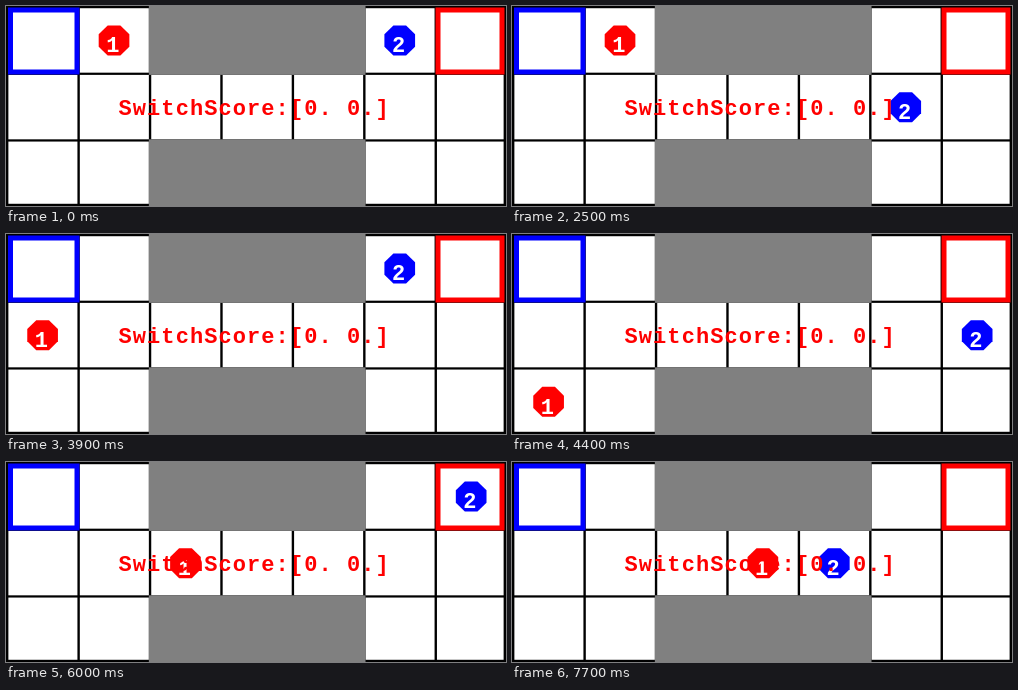
An HTML page that plays this animation: 500 px wide and 200 px high, repeating every 8000 ms.

```html
<!DOCTYPE html>
<html lang="en">
<head>
<meta charset="utf-8">
<title>Switch grid</title>
<style>
  html, body { margin: 0; width: 100%; height: 100%; overflow: hidden; background: #fff; }
  svg { display: block; width: 500px; height: 200px; }
  text { font: bold 22px "Liberation Mono", "DejaVu Sans Mono", monospace; white-space: pre; }
  .score { fill: #f00; letter-spacing: 1.08px; }
  .label { fill: #fff; text-anchor: middle; }
</style>
</head>
<body>
<svg id="stage" viewBox="0 0 500 200"></svg>
<script>
const LOOP = 8000, TICK = 100;
const CELL_W = 500 / 7, CELL_H = 200 / 3;
const LINE_W = 2.38, LINE_H = 2.22;
const stage = document.getElementById('stage');

function add(tag, attrs, parent = stage) {
  const el = document.createElementNS('http://www.w3.org/2000/svg', tag);
  for (const key in attrs) el.setAttribute(key, attrs[key]);
  return parent.appendChild(el);
}

function box(x, y, width, height, fill) {
  add('rect', { x, y, width, height, fill });
}

function frame(x, y, width, height, stroke) {
  const w = 5;
  add('rect', { x: x + w / 2, y: y + w / 2, width: width - w, height: height - w,
    fill: 'none', stroke, 'stroke-width': w });
}

function drawBoard() {
  for (let c = 0; c <= 7; c++) {
    box(Math.min(c * CELL_W, 500 - LINE_W), 0, LINE_W, 200, '#000');
  }
  for (let r = 0; r <= 3; r++) {
    box(0, Math.min(r * CELL_H, 200 - LINE_H), 500, LINE_H, '#000');
  }
  const wallW = 3 * CELL_W + LINE_W;
  box(2 * CELL_W, 0, wallW, CELL_H + LINE_H, '#808080');
  box(2 * CELL_W, 2 * CELL_H, wallW, CELL_H, '#808080');
  frame(2, 1.5, 71.5, 67, '#00f');
  frame(429.5, 1.5, 69, 67, '#f00');
}

// Moves read "tick + direction"; each one shifts the agent by a cell.
const STEP = { L: [-1, 0], R: [1, 0], U: [0, -1], D: [0, 1] };

function makeAgent(name, color, col, row, moves) {
  const group = add('g', {});
  const points = Array.from({ length: 8 }, (_, i) => {
    const a = (i + 0.5) * Math.PI / 4;
    return `${(16.6 * Math.cos(a)).toFixed(2)},${(16.2 * Math.sin(a)).toFixed(2)}`;
  });
  add('polygon', { points: points.join(' '), fill: color }, group);
  add('text', { class: 'label', x: -1.2, y: 11.8 }, group).textContent = name;

  const steps = moves.split(' ').map(m => ({ tick: parseInt(m, 10), dir: STEP[m.slice(-1)] }));
  return tick => {
    let x = col, y = row;
    for (const s of steps) {
      if (s.tick > tick) break;
      x += s.dir[0];
      y += s.dir[1];
    }
    group.setAttribute('transform',
      `translate(${x * CELL_W + 36.6} ${y * CELL_H + 34.5})`);
  };
}

drawBoard();
const agents = [
  makeAgent('1', '#f00', 1, 0,
    '2L 4R 7L 10R 17L 19R 20L 22R 26L 27D 29R 32D 34U 35L 37U 39D 41D 43R 44L ' +
    '46U 49D 52U 54R 58D 59U 60R 62R 64L 65R 69R 71L 73L 76R'),
  makeAgent('2', '#00f', 5, 0,
    '3D 8D 9R 10L 11U 13R 14D 15L 16R 17U 25L 27D 28R 30U 31U 33D 36U 38L 40R ' +
    '42D 45U 47L 48R 50D 53L 55D 56R 57U 59U 63D 67U 68L 69R 72D 75L 77L')
];
add('text', { class: 'score', x: 112.5, y: 109 }).textContent = 'SwitchScore:[0. 0.]';

const start = performance.now();
function draw() {
  const tick = Math.floor((performance.now() - start) % LOOP / TICK);
  agents.forEach(place => place(tick));
  requestAnimationFrame(draw);
}
draw();
</script>
</body>
</html>
```
